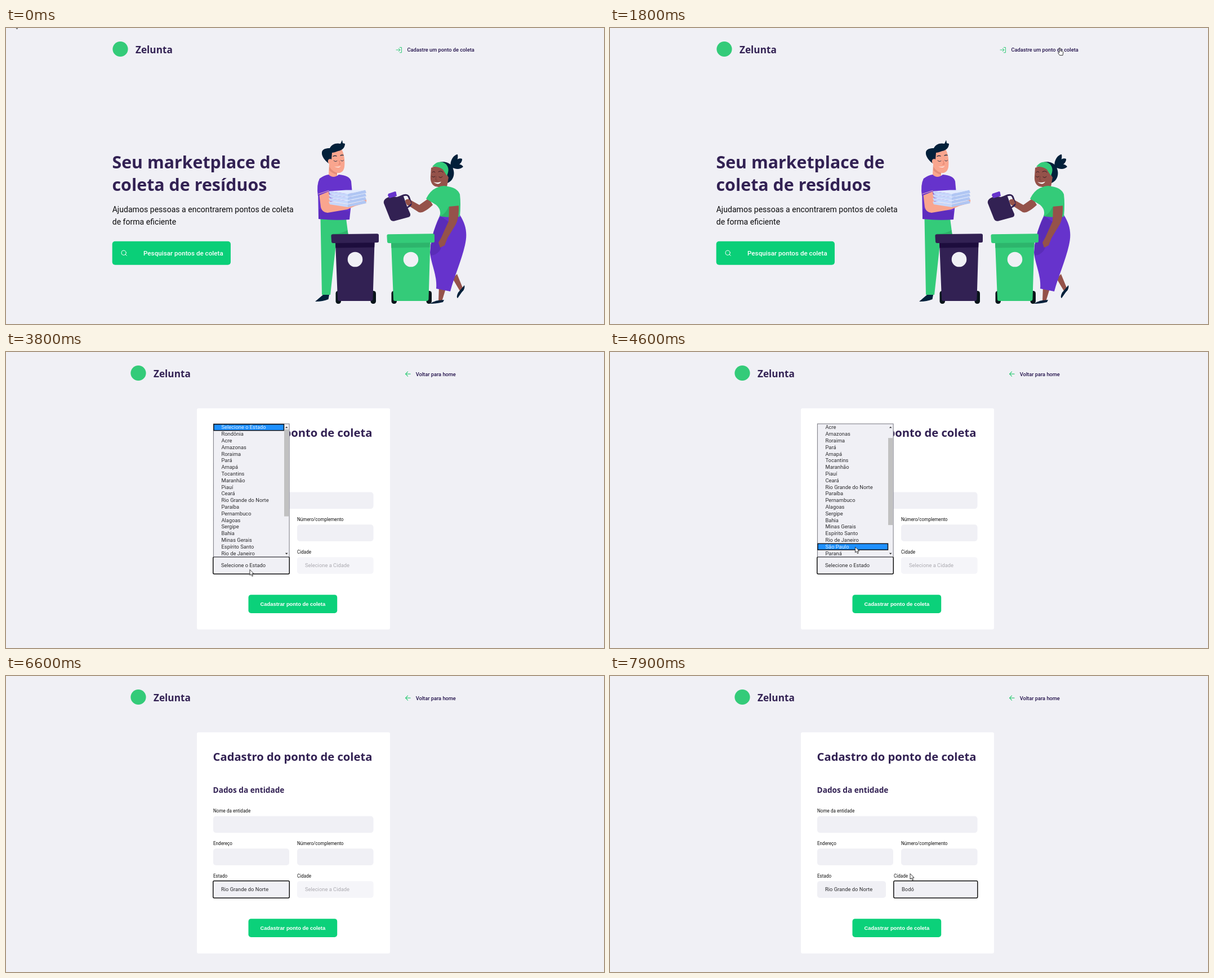
Animation, 1062 px wide and 527 px high, one loop 8000 ms. Source, as an HTML page:

```html
<!DOCTYPE html>
<html lang="pt-BR">
<head>
<meta charset="utf-8">
<title>Pontos de coleta</title>
<style>
  html, body { margin: 0; width: 100%; height: 100%; overflow: hidden; background: #f0f0f5; }
  svg { display: block; width: 100vw; height: 100vh; }
  text { font-family: Roboto, "Liberation Sans", sans-serif; white-space: pre; }
  .head { font-family: "Noto Sans", "Open Sans", sans-serif; font-weight: 700; fill: #322153; }
  .link { font-size: 9.25px; font-weight: 500; fill: #21104a; }
  .label { font-size: 8.15px; fill: #111; }
  .opt { font-size: 9.36px; fill: #2b2b2e; }
  .submit { font: 700 9.4px "Liberation Sans", Arial, sans-serif; fill: #fff; }
  .line { fill: none; stroke-linecap: round; stroke-linejoin: round; }
</style>
</head>
<body>
<svg id="stage" viewBox="0 0 1062 527" preserveAspectRatio="none">
  <defs>
    <g id="brand">
      <circle cx="14" cy="37.5" r="13.6" fill="#34cb79"/>
      <text class="head" x="41" y="44.5" font-size="17.2">Zelunta</text>
    </g>
  </defs>

  <g id="home">
    <use href="#brand" x="189"/>
    <path class="line" stroke="#34cb79" stroke-width="1" d="M693 39H700M697.2 36.2L700 39L697.2 41.8M699.3 34.5H702.5V43.8H699.3"/>
    <text class="link" x="712.5" y="42.2">Cadastre um ponto de coleta</text>
    <text class="head" x="188.5" y="249.5" font-size="30.3">Seu marketplace de</text>
    <text class="head" x="188.5" y="290" font-size="30.4">coleta de resíduos</text>
    <g font-size="14.09" fill="#0b0b0d">
      <text x="188.7" y="328">Ajudamos pessoas a encontrarem pontos de coleta</text>
      <text x="188.7" y="350">de forma eficiente</text>
    </g>
    <rect x="188.7" y="379.7" width="210.3" height="42" rx="5" fill="#0acf78"/>
    <g class="line" stroke="#fff" stroke-width="1">
      <circle cx="209.2" cy="400.2" r="4.1"/>
      <path d="M212.2 403.2L214.3 405.3"/>
    </g>
    <text x="244" y="405" font-size="11.65" font-weight="500" fill="#fff">Pesquisar pontos de coleta</text>

    <g id="man">
      <path fill="#34cb79" d="M558.5 339H604L608 370L586 384L576 475H561Z"/>
      <path fill="#2db46a" d="M580 366Q595 367 606.5 360L608 370H584Z"/>
      <path fill="#02203a" d="M549 487Q556 481 563 475H574L572.5 483Q561 487.5 549 487Z"/>
      <path fill="#f9a58e" d="M575 220L596 216C601 224 602 238 601 247C600 255 595 259 588 258L588 265Q580 269 573 262L574 241Z"/>
      <path fill="#e58d78" d="M574 247Q580 256 588 258V261Q579 259 574 253Z"/>
      <path fill="#02203a" d="M573 241C566 236 560 228 561 221C562 215 569 214 575 214C578 207 586 204 594 206L597 199.5L598 205L602 206C602 213 597 218 590 219C585 221 582 222 579 222L578 234Q573 230 573 241Z"/>
      <ellipse cx="574.5" cy="237.5" rx="2.7" ry="4" fill="#f9a58e"/>
      <g class="line" stroke="#02203a" stroke-width=".8">
        <path d="M581 228.5Q584 226.5 587 228M594 227Q597 225.5 599 226.5" stroke-width="1.2"/>
        <path d="M582 236Q585 239 588 236.5M594.5 235.5Q597 238.5 599.5 235.5"/>
      </g>
      <path class="line" stroke="#d8735f" stroke-width=".8" d="M591.5 236L593.5 242.5H590.5"/>
      <path fill="#fff" d="M583 246.5Q590 248.5 595 245.5Q590.5 250.5 583 246.5Z"/>
      <path fill="#6633cc" d="M557 268Q565 262 573 261Q581 269 591 261C603 262 611 265 613 273L615 295L610 341Q583 343 555 340L554 286Z"/>
      <path fill="#5727b3" d="M556 322L610 326L609.5 341Q583 343 555 340Z" opacity=".55"/>
      <path fill="#f9a58e" d="M556 293L573 291L576 309L610 311L628 304L638 303Q643 309 637 312L620 317L606 323L571 329Q561 328 559 319Z"/>
      <path fill="#6633cc" d="M557 268Q570 271 573 291L554 299Q551 279 557 268Z"/>
      <path class="line" stroke="#f0b5bd" stroke-width="1" d="M555 295.5L573 289.5"/>
      <g id="papers"></g>
    </g>

    <g id="woman">
      <path fill="#95524a" d="M793 446L801 438L810 460L813 467L806 468ZM769 459L781 464L774 487H768Z"/>
      <path fill="#02203a" d="M814 458Q816 464 809 471L802 481Q799 479 803 471ZM753 491Q760 486 768 485L778 484L776 488Q765 491 753 491Z"/>
      <path fill="#6633cc" d="M771 333H806C817 350 820 366 815 387C809 414 795 445 789 469L764 464C766 440 755 421 753 400Q754 368 771 333Z"/>
      <path fill="#5a2cb8" d="M772 335L786 345L774 372L769 383L773 391Q768 404 754 405Q752 371 772 335Z"/>
      <g fill="#02203a">
        <path d="M790 250C787 238 794 226 802 225C804 233 799 243 792 250Z"/>
        <path d="M790 250C794 238 803 230 810 233C811 240 802 246 792 250Z"/>
        <path d="M791 248C798 241 808 241 812 247C806 253 797 251 791 248Z"/>
        <path d="M763 243C770 236 785 237 791 245C799 256 796 271 784 276L774 260Z"/>
      </g>
      <path fill="#95524a" d="M755 249Q766 243 776 250L786 266L782 288L769 286L768 283C758 283 753 275 754 264Z"/>
      <path fill="#34cb79" d="M757 247C763 238 773 236 781 242Q789 250 783 263Q779 257 776 252Q769 246 757 247Z"/>
      <path class="line" stroke="#2a1720" stroke-width=".9" d="M756.5 264Q759 267 762 264M769 265Q772 268 775 264.5M757 257Q760 254 762 257M768 256Q773 253 776 257"/>
      <path class="line" stroke="#703a36" stroke-width=".8" d="M764 264L763 271H766"/>
      <path fill="#fff" d="M759 274Q766 276.5 773 273.5Q768 281 759 274Z"/>
      <path fill="#95524a" d="M751 303L734 315L716 305L710 308L713 315L733 328Q741 331 758 315Z"/>
      <path fill="#34cb79" d="M766 284Q776 279 784 282Q801 284 806 296Q808 312 806 336Q788 338 770 335Q774 324 764 315L746 304Q754 288 766 284Z"/>
      <path fill="#2db46a" d="M788 312L786 336Q778 337 772 335Q784 328 788 312Z"/>
      <path fill="#95524a" d="M787 316L804 315Q805 339 798 351L784 374L779 387L771 391L768 382L773 373L786 344Z"/>
      <path fill="#34cb79" d="M786 291Q803 287 807 316L786 318Z"/>
    </g>

    <g id="jug">
      <path fill="#322153" d="M674 304Q682 298 694 301L705 297L712 317L718 331Q719 336 714 337L690 343.5Q685 345 682 340L671 312Q670 307 674 304Z"/>
      <path class="line" stroke="#322153" stroke-width="3" d="M702 299.5Q713 294.5 715.5 301L719 311Q720 316 713.5 319"/>
      <path fill="#95524a" d="M709 307Q712 303.5 717 305.5L720 312.5L713.5 316Q709.5 313 709 307Z"/>
      <path fill="#6633cc" d="M679 295L691 291Q693 291 693 294L694 299L681 303L678 298Z"/>
    </g>
    <g id="bins"></g>
  </g>

  <g id="form">
    <use href="#brand" x="221"/>
    <path class="line" stroke="#34cb79" stroke-width="1.2" d="M718 39.2H709.5M713.5 35.2L709.5 39.2L713.5 43.2"/>
    <text class="link" x="727.7" y="42.6">Voltar para home</text>
    <rect x="339" y="100.3" width="343" height="393.7" rx="3" fill="#fff"/>
    <text class="head" x="367.6" y="150.7" font-size="20.2">Cadastro do ponto de coleta</text>
    <text class="head" x="367.6" y="208" font-size="13.65">Dados da entidade</text>
    <g class="label">
      <text x="368" y="243">Nome da entidade</text>
      <text x="368" y="301">Endereço</text>
      <text x="517" y="301">Número/complemento</text>
      <text x="368" y="359">Estado</text>
      <text id="cityLabel" y="359">Cidade</text>
    </g>
    <g fill="#f0f0f5">
      <rect x="368" y="249.5" width="284.5" height="29.7" rx="4.7"/>
      <rect x="368" y="307.3" width="135" height="29.7" rx="4.7"/>
      <rect x="517" y="307.3" width="135.5" height="29.7" rx="4.7"/>
      <rect id="stateBox" x="368" y="365.2" height="29.7" rx="4.7"/>
      <rect id="cityBox" y="365.2" height="29.7" rx="4.7"/>
    </g>
    <rect id="focus" y="364.8" height="30.4" rx="2.2" fill="none" stroke="#111" stroke-width="1.5"/>
    <text id="stateText" class="opt" x="382" y="383.4"></text>
    <text id="cityText" class="opt" y="383.4"></text>
    <rect x="430.5" y="432.2" width="157.7" height="32.8" rx="4.7" fill="#0bd17a"/>
    <text class="submit" x="451.5" y="451.8">Cadastrar ponto de coleta</text>
    <g id="lists"></g>
  </g>

  <g id="cursor" stroke="#222" stroke-width=".9" fill="#fff" stroke-linejoin="round">
    <path id="arrow" d="M0 0V10L2.3 7.9L4 11.8L5.7 11L4.1 7.3H7.1Z"/>
    <path id="hand" d="M-1 0.4Q.3 -1 1.3 .4V5L4.6 5.6Q6 6 5.8 8L5 12.6H-.4L-3.4 8.2Q-3.6 6.4 -1 8Z"/>
  </g>
</svg>

<script>
const LOOP = 8000, STEP = 100, ROWS = 20, ROW_H = 11.805, LIST_Y = 128.2;
const $ = id => document.getElementById(id);
const set = (el, attrs) => { for (const k in attrs) el.setAttribute(k, attrs[k]); };
const show = (el, on) => { el.style.display = on ? "" : "none"; };

const states = ("Selecione o Estado,Rondônia,Acre,Amazonas,Roraima,Pará,Amapá,Tocantins,Maranhão,Piauí,Ceará," +
  "Rio Grande do Norte,Paraíba,Pernambuco,Alagoas,Sergipe,Bahia,Minas Gerais,Espírito Santo," +
  "Rio de Janeiro,São Paulo,Paraná").split(",");
const cities = ("Selecione a Cidade,Acari,Açu,Afluente Belo,Água Nova,Alexandria,Alto Sereno,Alto do Ribeirão," +
  "Angicos,Antigo Moinho,Apodi,Areia Branca,Arês,Augusta Serra,Baía Formosa,Baraúna,Barcelona," +
  "Bento Ferreiro,Bodó,Bom Jesus").split(",");

// Cursor stops: time, x, y
const stops = [
  [0, 15, -10], [100, 40, 6], [200, 70, 19], [300, 70, 19], [1200, 544, 30], [1600, 799, 36],
  [1800, 799, 36], [2000, 806, 29], [2300, 799, 43], [2500, 799, 43], [2600, 800, 54],
  [2800, 800, 54], [3600, 431, 384], [3700, 431, 384], [3900, 435, 391], [4100, 435, 391],
  [4600, 435.5, 347], [5000, 435, 319], [5100, 435, 319], [5600, 435, 270.5], [6000, 436, 240],
  [6600, 436, 240], [7000, 533, 378], [7300, 533, 378], [7600, 533, 351.8], [8000, 533, 351.8]
];

function cursorAt(t) {
  const i = stops.findIndex(s => s[0] > t);
  const [t0, x0, y0] = stops[i - 1], [t1, x1, y1] = stops[i];
  const k = (t - t0) / (t1 - t0);
  return [x0 + (x1 - x0) * k, y0 + (y1 - y0) * k];
}

function bin(x, body, shade) {
  return `<g transform="translate(${x} 366)">
    <rect x="8.5" y="102" width="9.5" height="23" rx="4.5" fill="#08141a"/>
    <rect x="70.5" y="102" width="9.5" height="23" rx="4.5" fill="#08141a"/>
    <path fill="${body}" d="M8 15H77.5L74.5 117Q74 120 71 120H15Q12 120 12 117Z"/>
    <path fill="${shade}" d="M8 16H77.5L77.2 24.5L8.4 25.5Z"/>
    <path fill="${body}" d="M3 1.2L82 .2Q85 .2 85 3V13.5Q85 16 82 16L4 17Q1 17 1 14L.4 4Q.4 1.4 3 1.2Z"/>
    <circle cx="43" cy="46" r="13.3" fill="#f0f0f5"/></g>`;
}

function paper(i) {
  const y = 313 - i * 6.2;
  return `<path fill="#c6d7fb" d="M573 ${y - 4}L607 ${y + 1}V${y + 6}L575 ${y + 1}Z"/>
    <path fill="#b0c6f3" d="M607 ${y + 1}L638 ${y - 6}L640 ${y - 1}L607 ${y + 6}Z"/>
    <path fill="#e2ebfe" d="M573 ${y - 4}L604 ${y - 6}L638 ${y - 6}L607 ${y + 1}Z"/>`;
}

function makeList(x, width, items, total) {
  const g = document.createElementNS("http://www.w3.org/2000/svg", "g");
  const bar = x + width - 9.5, track = 217, mid = bar + 4.2;
  g.innerHTML = `<rect x="${x + .4}" y="127.9" width="${width - .8}" height="236.6" fill="#f0f0f5" stroke="#777780"/>
    <rect x="${x + 1}" width="${width - 11}" height="11" fill="#1e90ff" stroke="#080c12" stroke-width="1.4"/>
    <rect x="${bar}" width="8" height="${track * ROWS / total}" fill="#c1c1c1"/>
    <path fill="#333" d="M${mid - 2.3} 135.3h4.6l-2.3 -2.6zM${mid - 2.3} 357.8h4.6l-2.3 2.6z"/>` +
    Array.from({ length: ROWS }, (_, i) =>
      `<text class="opt" x="${x + 14.5}" y="${LIST_Y + i * ROW_H + 9.2}"></text>`).join("");
  $("lists").append(g);
  const [, mark, thumb] = g.querySelectorAll("rect");
  const rows = g.querySelectorAll("text");
  return (open, scroll, cursorY) => {
    show(g, open);
    if (!open) return;
    const over = Math.floor((cursorY - LIST_Y) / ROW_H);
    const pick = over < ROWS ? over : -scroll;
    show(mark, pick >= 0);
    set(mark, { y: LIST_Y + pick * ROW_H + .5 });
    set(thumb, { y: 137.6 + track * scroll / total });
    rows.forEach((r, i) => {
      r.textContent = items[i + scroll];
      r.style.fill = i === pick ? "#e6f2ff" : "";
    });
  };
}

$("papers").innerHTML = [0, 1, 2, 3].map(paper).join("");
$("bins").innerHTML = bin(577, "#322153", "#1d0d3d") + bin(676, "#34cb79", "#2db56c");
const stateList = makeList(368, 135.5, states, 28);
const cityList = makeList(504, 149, cities, 168);

function draw(t) {
  const [x, y] = cursorAt(t);
  const onHome = t < 2800;
  show($("home"), onHome);
  show($("form"), !onHome);

  const over = onHome && x > 712 && y < 47;
  show($("cursor"), t < 6300 || t >= 6800);
  show($("hand"), over);
  show($("arrow"), !over);
  set($("cursor"), { transform: `translate(${x} ${y})` });
  if (onHome) return;

  const loaded = t >= 6700, onCity = t >= 7000;
  const cityX = loaded ? 504 : 517, stateW = loaded ? 122 : 135;
  set($("stateBox"), { width: stateW });
  set($("cityBox"), { x: cityX, width: 652.6 - cityX, fill: loaded ? "#f0f0f5" : "#f5f5f9" });
  set($("cityLabel"), { x: cityX });
  set($("cityText"), { x: cityX + 14 });
  $("cityText").style.fill = loaded ? "" : "#abaab0";
  $("stateText").textContent = t < 6200 ? states[0] : states[11];
  $("cityText").textContent = t < 7800 ? cities[0] : cities[18];

  show($("focus"), t >= 3700);
  set($("focus"), onCity ? { x: 503.8, width: 149 } : { x: 367.8, width: stateW + .5 });
  const scroll = t < 4400 ? 0 : t < 4500 ? 1 : 2;
  stateList(t >= 3800 && t < 6200, scroll, y);
  cityList(t >= 7100 && t < 7800, 0, y);
}

function tick(now) {
  draw(Math.floor(now % LOOP / STEP) * STEP);
  requestAnimationFrame(tick);
}
draw(0);
requestAnimationFrame(tick);
</script>
</body>
</html>
```
